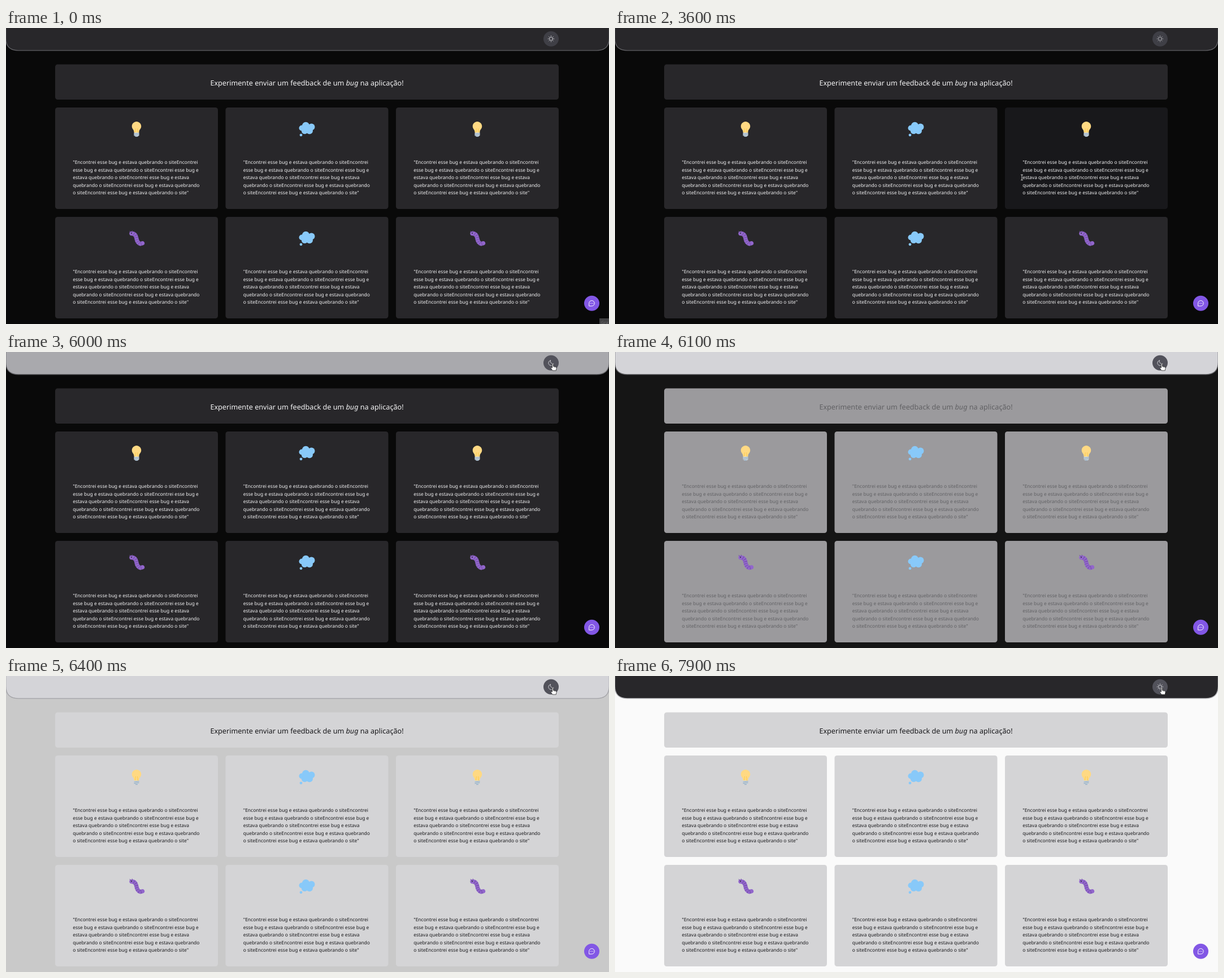
Write an HTML page that moves like this. It is 1067x525 px and loops after 8000 ms.

```html
<!DOCTYPE html>
<html lang="pt">
<head>
<meta charset="utf-8">
<style>
  html, body { margin: 0; width: 100%; height: 100%; overflow: hidden; background: #090909; }
  svg { display: block; }
  text { font-family: "Noto Sans", "Open Sans", sans-serif; text-rendering: geometricPrecision; white-space: pre; }
</style>
</head>
<body>
<svg id="stage" width="1067" height="525" viewBox="0 0 1067 525">
  <defs>
    <g id="bulb">
      <path transform="translate(-13.5 -13.6) scale(.75)" fill="#ffd983" d="M29 11c0 6.5-5 7.5-5 13.5 0 3-3 3.4-5.5 3.4-2 0-6.6-.8-6.6-3.4C11.9 18.5 7 17.5 7 11 7 5 12.3.1 18 .1S29 5 29 11z"/>
      <path d="M-2.6 5.8L-1.5-1.5M2.6 5.8L1.5-1.5" stroke="#ffcc4d" fill="none"/>
      <path d="M-4.5 6h9v5.3L1.6 13.2h-3.2L-4.5 11.3z" fill="#ccd6dd"/>
      <path d="M-4.5 8.7L4.5 7.2M-4.5 11.2L4.5 9.7M-2 12.9H2" stroke="#8ba5bd" fill="none"/>
    </g>
    <g id="cloud" fill="#88c9f9">
      <circle cx="-9" cy="-2" r="5"/><circle cx="-2" cy="-6.2" r="6.6"/>
      <circle cx="8" cy="-4" r="6"/><circle cx="4.5" cy="2.8" r="6"/>
      <circle cx="-4" cy="3" r="5.6"/><circle cy="-1" r="7"/>
      <circle cx="-10.5" cy="10.3" r="2.4"/>
    </g>
    <g id="worm" fill="none">
      <path d="M-9-9Q-2-9-.5-2Q1 8 7 9.3L10.5 8.2" stroke="#9266cc" stroke-width="7.4" stroke-linecap="round"/>
      <path d="M-5-8.2Q-1.5-6-.5-2Q1 8 7 9.3L11 8.2" stroke="#7450a8" stroke-width="7" stroke-dasharray="1 2.8"/>
      <path d="M-9.5-10.5L-12.3-13.5M-7.5-11L-7.7-14" stroke="#7450a8"/>
      <circle cx="-9" cy="-9.6" r="1" fill="#292f33"/>
    </g>
    <g id="arrow"><path d="M0 0V10L2.3 8 4 11.6 5.7 10.9 4.1 7.3H7.2z" fill="#fff" stroke="#111" stroke-width=".6"/></g>
    <g id="beam" fill="none">
      <path d="M-2-4.7H2M0-4.7V4.7M-2 4.7H2" stroke="#ccc"/>
    </g>
    <g id="hand">
      <path d="M-1 .8Q0-.6 1 .8V5L5 5.7Q6.8 6 6.6 8L5.8 12.4H-.4L-3.5 8Q-3.5 6.3-1 7.6z" fill="#fff" stroke="#111" stroke-width=".7"/>
      <path d="M2.8 5.5V7.3M4.6 5.8V7.4" stroke="#555" stroke-width=".5"/>
    </g>
  </defs>

  <rect id="page" width="1067" height="525"/>
  <path id="header" d="M-.3-2V18Q-.3 39.8 21.5 39.8H1045.5Q1067.3 39.8 1067.3 18V-2" stroke-width="1.3"/>
  <circle id="toggle" cx="964.5" cy="19.2" r="13.5"/>
  <g id="icon" transform="translate(964.5 19.2)" fill="none" stroke-width=".9" stroke-linecap="round">
    <g id="sun"><circle r="3"/></g>
    <path id="moon" d="M-1.2-4.2A4.6 4.6 0 1 0 4.4 1.5A4.6 4.6 0 0 1-1.2-4.2z"/>
  </g>
  <g id="banner">
    <rect x="87" y="64.5" width="891" height="62.5" rx="4.5"/>
    <text x="532.5" y="101.5" font-size="12.63" text-anchor="middle">Experimente enviar um feedback de um <tspan font-style="italic">bug</tspan> na aplicação!</text>
  </g>
  <g id="cards"></g>
  <g transform="translate(1036.5 488.3)">
    <circle r="13.5" fill="#8257e5"/>
    <path d="M-4.8 4.8V0A4.8 4.8 0 1 1 0 4.8z" fill="none" stroke="#fff" stroke-linejoin="round"/>
    <path d="M-2.3 0h.01M0 0h.01M2.3 0h.01" stroke="#fff" stroke-width="1.3" stroke-linecap="round"/>
  </g>
  <g id="tip">
    <rect x="1050" y="515" width="17" height="10" fill="#424244"/>
    <text x="1053" y="524.5" font-size="7.5" fill="#6c6c6e">Gra</text>
  </g>
  <use id="cursor"/>
</svg>
<script>
const LOOP = 8000, STEP = 100;
const $ = id => document.getElementById(id);
const clamp = v => Math.max(0, Math.min(1, v));
const ramp = (t, start, length) => clamp((t - start) / length);
const smooth = u => u * u * (3 - 2 * u);

// Blend two hex colours.
function mix(a, b, u) {
  const part = (c, i) => parseInt(c.slice(i, i + 2), 16);
  return `rgb(${[1, 3, 5].map(i => Math.round(part(a, i) + (part(b, i) - part(a, i)) * u))})`;
}

const lines = [
  '"Encontrei esse bug e estava quebrando o siteEncontrei',
  'esse bug e estava quebrando o siteEncontrei esse bug e',
  'estava quebrando o siteEncontrei esse bug e estava',
  'quebrando o siteEncontrei esse bug e estava quebrando',
  'o siteEncontrei esse bug e estava quebrando o site"'
];

const cards = ['bulb', 'cloud', 'bulb', 'worm', 'cloud', 'worm'].map((icon, i) => {
  const x = 87 + (i % 3) * 301.5, y = 141 + Math.floor(i / 3) * 194;
  const text = lines.map((s, k) => `<tspan x="31.2" y="${100 + k * 13.5}">${s}</tspan>`).join('');
  $('cards').insertAdjacentHTML('beforeend',
    `<g transform="translate(${x} ${y})"><rect width="288" height="180" rx="4.5"/>
     <use href="#${icon}" x="144" y="38.5"/><text font-size="8.47">${text}</text></g>`);
  return { x, y, el: $('cards').lastElementChild };
});

for (let a = 0; a < 360; a += 45)
  $('sun').insertAdjacentHTML('beforeend', `<path d="M0-4.6V-5.3" transform="rotate(${a})"/>`);

// Pointer path: time, x, y
const path = [
  [600, 1032, 521], [1000, 1010, 482], [1400, 983, 449], [1600, 991, 442], [1800, 986, 431],
  [2000, 983, 436], [2300, 983, 436], [2700, 880, 474], [3000, 760, 400], [3200, 735, 285],
  [3600, 720, 265], [3800, 560, 285], [3950, 445, 250], [4100, 570, 215], [4200, 598, 234],
  [4300, 598, 234], [4600, 432, 270], [4800, 560, 200], [5000, 840, 120], [5200, 955, 34.5],
  [5300, 957, 30], [5500, 967.5, 20.5]
];

function pointer(t) {
  if (t < path[0][0]) return [-99, -99];
  const k = path.findIndex(p => p[0] > t);
  if (k < 0) return path[path.length - 1].slice(1);
  const a = path[k - 1], b = path[k], u = ramp(t, a[0], b[0] - a[0]);
  return [a[1] + (b[1] - a[1]) * u, a[2] + (b[2] - a[2]) * u];
}

const inside = ([x, y], c) => x > c.x && x < c.x + 288 && y > c.y && y < c.y + 180;
const onText = ([x, y], c) => x > c.x + 29 && x < c.x + 256 && y > c.y + 91 && y < c.y + 157;
const onToggle = ([x, y]) => Math.hypot(x - 964.5, y - 19.2) < 13.5;

// Share of the last 150 ms spent over a card.
function hover(t, card) {
  let n = 0;
  for (let k = 0; k < 10; k++) n += inside(pointer(t - k * 15), card);
  return n / 10;
}

function paint(el, fill, ink) {
  el.querySelector('rect').setAttribute('fill', fill);
  el.querySelector('text').setAttribute('fill', ink);
}

function draw(t) {
  const head = ramp(t, 5850, 200) - ramp(t, 7650, 200);
  const panel = ramp(t, 6000, 150);
  const page = smooth(ramp(t, 6030, 520));
  const pos = pointer(t), over = onToggle(pos);
  const light = t >= 5900 && t < 7700;

  $('page').setAttribute('fill', mix('#090909', '#fafafa', page));
  $('header').setAttribute('fill', mix('#28272a', '#d4d4d8', head));
  $('header').setAttribute('stroke', mix('#626266', '#b4b4b8', page));
  $('toggle').setAttribute('fill', over ? '#52525b' : '#3f3f46');
  $('icon').setAttribute('stroke', t < 100 || over ? '#dedee2' : '#b9b9be');
  $('sun').style.display = light ? 'none' : '';
  $('moon').style.display = light ? '' : 'none';
  $('tip').style.display = t < 100 ? '' : 'none';

  const fill = mix('#28272a', '#d4d4d6', panel), ink = mix('#f4f4f5', '#18181b', panel);
  paint($('banner'), fill, ink);
  for (const c of cards) {
    const h = hover(t, c);
    paint(c.el, h ? mix('#28272a', '#18181b', h) : fill, ink);
  }

  const kind = over ? 'hand' : cards.some(c => onText(pos, c)) ? 'beam' : 'arrow';
  $('cursor').setAttribute('href', '#' + kind);
  $('cursor').setAttribute('transform', `translate(${pos})`);
}

function tick() {
  draw(Math.floor(performance.now() % LOOP / STEP) * STEP);
  requestAnimationFrame(tick);
}
tick();
</script>
</body>
</html>
```
